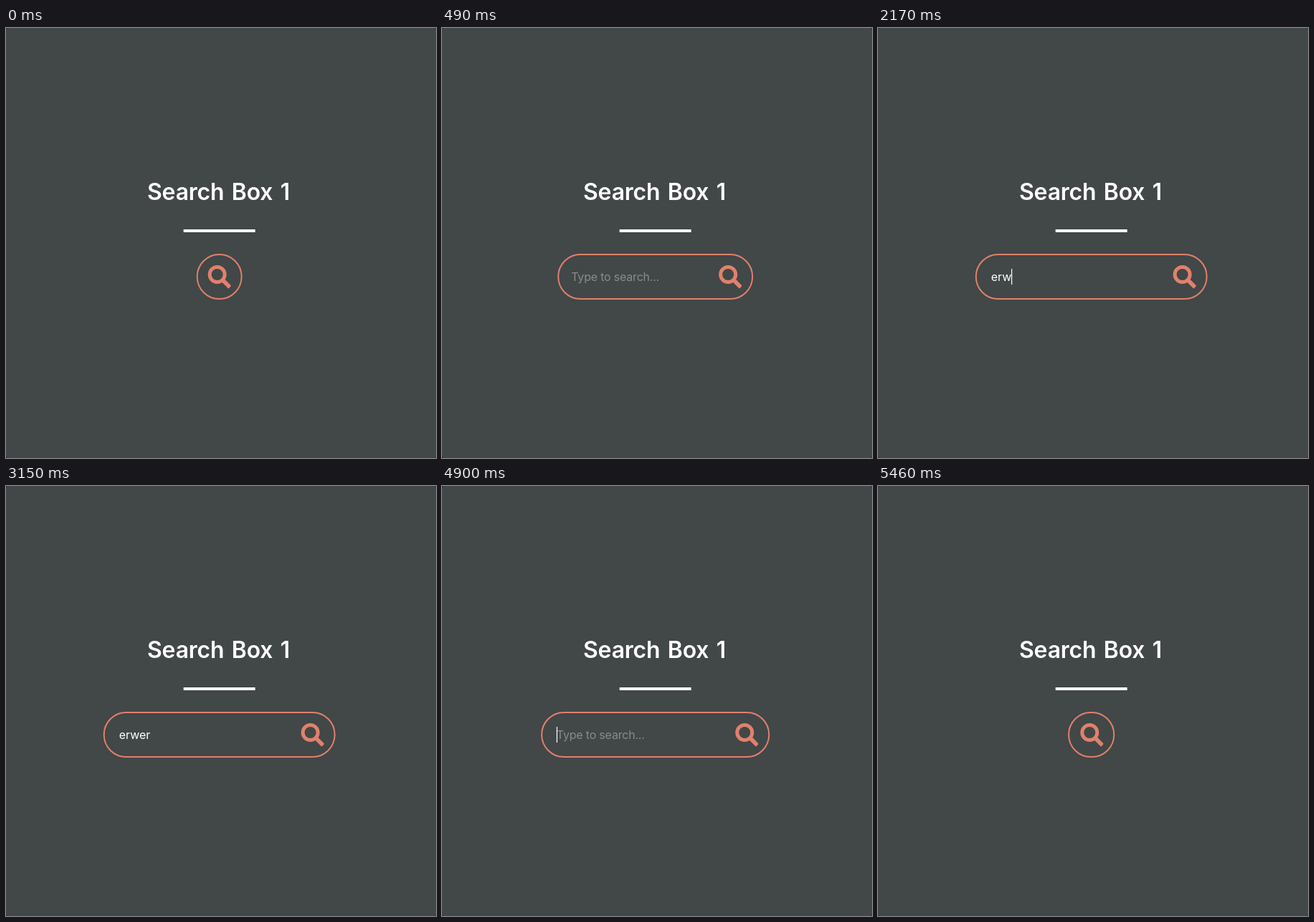
Animation, 600 px wide and 600 px high, one loop 5.53 s. Source, as an HTML page:

```html
<!DOCTYPE html>
<html lang="en">
<head>
<meta charset="utf-8">
<title>Search box</title>
<style>
  html, body { margin: 0; width: 100%; height: 100%; overflow: hidden; background: #242627; }
  svg { display: block; width: 100%; height: 100%; background: #424748; border-radius: 3px; }
  text { font-family: Inter, "Open Sans", sans-serif; fill: #fff; }
  .title { font-size: 32px; font-weight: 600; letter-spacing: -.2px; word-spacing: 2.5px; }
  .field { font-size: 16px; }
  #hint { fill: #8a8b8b; letter-spacing: -.2px; }
  .line { fill: none; stroke: #e0816b; }
</style>
</head>
<body>
<svg viewBox="0 0 600 600">
  <defs>
    <clipPath id="clip"><rect id="window" x="-1" y="316" height="62"/></clipPath>
  </defs>
  <text class="title" x="197" y="239.8">Search Box 1</text>
  <rect x="247.7" y="281" width="100" height="4" fill="#fff"/>
  <rect id="box" class="line" y="316" height="62" rx="31" stroke-width="2"/>
  <g id="input" clip-path="url(#clip)">
    <text id="hint" class="field" y="353">Type to search...</text>
    <text id="typed" class="field" y="353"></text>
    <rect id="caret" y="336" width="1.2" height="22" fill="#fff"/>
  </g>
  <g id="icon" class="line" stroke-width="5">
    <circle cx="13" cy="13" r="10.5"/>
    <path d="M20.5 20.5L25 25"/>
    <rect x="30" y="-2.8" width="13.5" height="5.6" rx="1.5" transform="rotate(45)"
          fill="#e0816b" stroke="none"/>
  </g>
</svg>
<script>
  const LOOP = 5530, CENTER = 297.7, CLOSED = 64, GROWTH = 260, MOVE = 640;
  const OPEN_AT = 170, CLOSE_AT = 4880;

  // [time, value] steps; the last one reached applies
  const typing = [
    [0, ""], [1680, "e"], [1890, "er"], [2100, "erw"], [2380, "erwe"], [2590, "erwer"],
    [3500, "erwe"], [3640, "erw"], [3780, "er"], [3920, "e"], [4130, ""]
  ];
  const blinking = [
    [0, false], [1330, true], [3150, false], [3640, true],
    [4690, false], [4900, true], [5440, false]
  ];

  const $ = id => document.getElementById(id);
  const [box, input, win, hint, typed, caret, icon] =
    ["box", "input", "window", "hint", "typed", "caret", "icon"].map($);

  const valueAt = (steps, t) => steps.filter(s => s[0] <= t).pop()[1];
  const bezier = (a, b, u) => 3 * a * u * (1 - u) ** 2 + 3 * b * u * u * (1 - u) + u ** 3;

  // CSS "ease": cubic-bezier(.25, .1, .25, 1)
  function ease(x) {
    if (x <= 0) return 0;
    if (x >= 1) return 1;
    let lo = 0, hi = 1;
    for (let i = 0; i < 24; i++) {
      const mid = (lo + hi) / 2;
      if (bezier(.25, .25, mid) < x) lo = mid; else hi = mid;
    }
    return bezier(.1, 1, lo);
  }

  function draw(t) {
    const open = ease((t - OPEN_AT) / MOVE) - ease((t - CLOSE_AT) / MOVE);
    const width = CLOSED + GROWTH * open;
    const left = CENTER - width / 2;
    const word = valueAt(typing, t);

    box.setAttribute("x", left + 1);
    box.setAttribute("width", width - 2);
    icon.setAttribute("transform", `translate(${left + width - 48} 331)`);

    input.setAttribute("transform", `translate(${left + 7 + 15 * open} 0)`);
    input.style.display = open > .015 ? "" : "none";
    win.setAttribute("width", 1 + 220 * open);
    hint.style.display = word ? "none" : "";
    typed.textContent = word;
    caret.setAttribute("x", word ? typed.getComputedTextLength() - .3 : 0);
    caret.style.display = valueAt(blinking, t) ? "" : "none";
  }

  const start = performance.now();
  function tick() {
    draw((performance.now() - start) % LOOP);
    requestAnimationFrame(tick);
  }
  tick();
</script>
</body>
</html>
```
